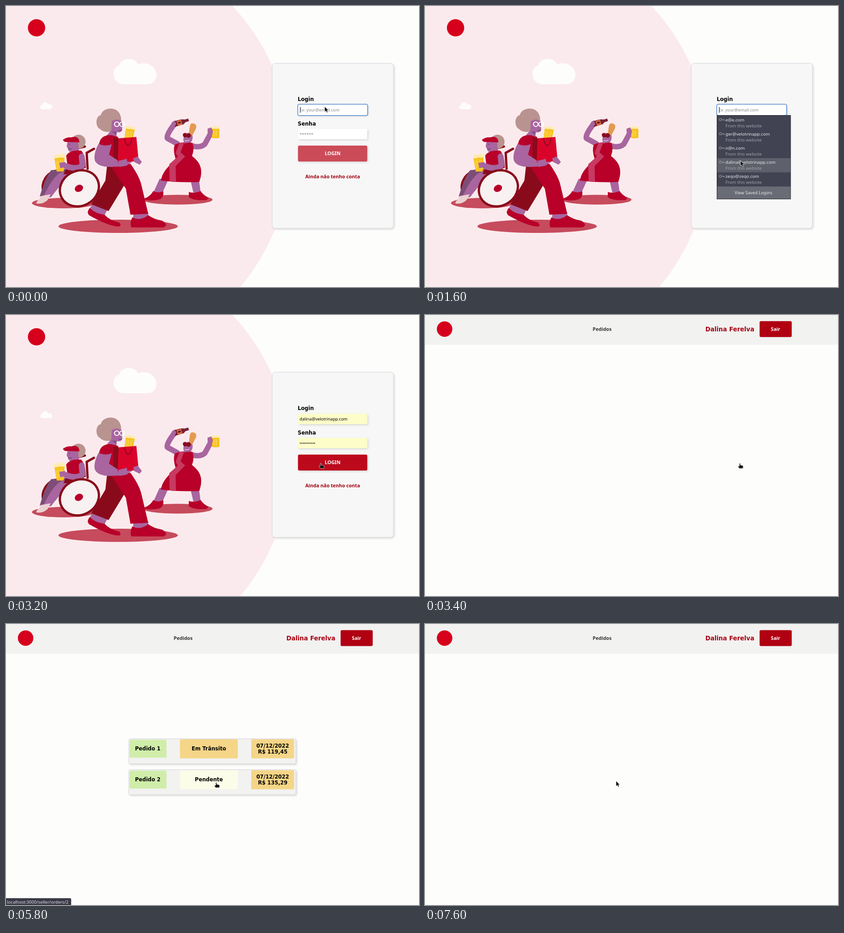
An HTML page for the animation above (8000 ms loop, 906x618 px).

```html
<!DOCTYPE html>
<html lang="pt">
<head>
<meta charset="utf-8">
<title>Pedidos</title>
<style>
html, body { margin: 0; width: 100%; height: 100%; overflow: hidden; background: #fdfdfc; }
svg { display: block; width: 906px; height: 618px; }
text { font: 9.6px "Noto Sans", sans-serif; }
.label { font: bold 11.4px "DejaVu Sans", sans-serif; }
.strong { font: bold 10.6px "Noto Sans", sans-serif; }
.input { font-size: 9.2px; }
.mid { text-anchor: middle; }
.red { fill: #b80029; } .dark { fill: #890b1b; } .skin { fill: #a8659f; }
.shade { fill: #7d4d77; } .hair { fill: #b9938f; } .floor { fill: #c64b5c; }
.gold { fill: #f8c31f; } .foam { fill: #fdebb4; }
.limb { fill: none; stroke: #a8659f; stroke-linecap: round; stroke-linejoin: round; }
.frame { fill: none; stroke: #890b1b; stroke-width: 5; stroke-linecap: round; }
.soft { filter: drop-shadow(2px 2px 2px #0002); }

/* one 8 s loop, picture changes on a 200 ms grid */
.t { animation: 8s step-end infinite; }
.app { animation-name: app; }
.menu { animation-name: menu; }
.hover { animation-name: hover; }
.empty { animation-name: empty; }
.filled { animation-name: filled; }
.focus { animation-name: focus; }
.button { animation-name: button; }
.orders { animation-name: orders; }
.status { animation-name: status; }
.hand { animation-name: hand; }
.arrow { animation-name: arrow; }
.pointer { animation: pointer 8s step-end infinite; }
@keyframes app { 0% { opacity: 0 } 42.5%, 100% { opacity: 1 } }
@keyframes menu { 0% { opacity: 0 } 5% { opacity: 1 } 22.5%, 100% { opacity: 0 } }
@keyframes hover {
  0% { transform: none } 12.5% { transform: translateY(31.2px) }
  15% { transform: translateY(62.4px) } 17.5%, 100% { transform: translateY(93.6px) }
}
@keyframes empty { 0% { opacity: 1 } 22.5%, 100% { opacity: 0 } }
@keyframes filled { 0% { opacity: 0 } 22.5%, 100% { opacity: 1 } }
@keyframes focus { 0% { opacity: 1 } 37.5%, 100% { opacity: 0 } }
@keyframes button { 0% { fill: #cb4b58 } 22.5% { fill: #b00012 } 37.5%, 100% { fill: #bd091c } }
@keyframes orders { 0% { opacity: 0 } 45% { opacity: 1 } 95%, 100% { opacity: 0 } }
@keyframes status { 0% { opacity: 0 } 62.5% { opacity: 1 } 95%, 100% { opacity: 0 } }
@keyframes hand {
  0% { opacity: 0 } 22.5% { opacity: 1 } 45% { opacity: 0 }
  62.5% { opacity: 1 } 95%, 100% { opacity: 0 }
}
@keyframes arrow {
  0% { opacity: 1 } 22.5% { opacity: 0 } 45% { opacity: 1 }
  62.5% { opacity: 0 } 95%, 100% { opacity: 1 }
}
@keyframes pointer {
  0% { transform: translate(699px, 221px) }
  2.5% { transform: translate(699px, 221px); animation-timing-function: steps(3) }
  10% { transform: translate(693.5px, 276px); animation-timing-function: steps(3) }
  17.5% { transform: translate(692px, 340px) }
  27.5% { transform: translate(692px, 338px) }
  32.5% { transform: translate(692px, 338px); animation-timing-function: steps(2) }
  37.5% { transform: translate(690.5px, 325.5px) }
  60% { transform: translate(690.5px, 325.5px); animation-timing-function: steps(4) }
  70%, 85% { transform: translate(461px, 348px); animation-timing-function: steps(3) }
  92.5%, 100% { transform: translate(419px, 345px) }
}
</style>
</head>
<body>
<svg viewBox="0 0 906 618">
  <defs>
    <g id="key" fill="none" stroke="#a4a5ae"><circle cx="648" cy="250" r="2.6"/><path d="M650.6 250H656.5V252.5M654 250V252"/></g>
    <g id="beer">
      <path class="gold" d="M1 3H17V26Q9 28 1 26Z"/>
      <path class="foam" d="M0 4Q0 1 4 1Q8 -2 12 1Q18 0 18 4L17 6H1Z"/>
      <path d="M5 10V23M10 10V23" stroke="#fbd95c" stroke-width="2"/>
    </g>
  </defs>

  <rect width="906" height="618" fill="#fdfdfc"/>
  <circle cx="157" cy="318.6" r="466" fill="#fbeaed"/>
  <circle cx="67" cy="48" r="19" fill="#d6001c"/>
  <g fill="#fdfdfc">
    <path d="M257 172C231 171 231 132 248 132C252 112 284 112 290 129C308 119 330 134 330 151Q329 171 310 172Z"/>
    <path d="M80 227C73 226 74 218 79 218C80 210 91 210 92 216Q101 215 101.500 222Q101 227 96 227Z"/>
  </g>

  <!-- floor shadows -->
  <g class="floor">
    <ellipse cx="126" cy="433.500" rx="69" ry="11.500"/>
    <ellipse cx="377" cy="426" rx="76" ry="10.800"/>
    <ellipse cx="246" cy="484.500" rx="131" ry="14.500"/>
  </g>

  <!-- seated figure -->
  <g>
    <path class="frame" d="M112 362C88 366 76 390 82 408Q87 419 99 416M157 313L173 309"/>
    <path class="shade" d="M99 361L139 358L134 374L112 384L94 418L74 419Q86 378 99 361Z"/>
    <path class="skin" d="M118 367L138 362L142 374L124 389L98 421L82 419Q100 380 118 367Z"/>
    <path d="M76 418L98 414L91 427Q80 437 66 434Q68 428 74 424Z" fill="#ead2d2"/>
    <path class="frame" d="M193 314L177 323L179 358"/>
    <circle class="hair" cx="159" cy="298.500" r="15.500"/>
    <path class="skin" d="M135 298L158 299L160 318L146 322Q136 321 136 314L133 309Z"/>
    <path class="red" d="M125 294Q134 288 143 289Q160 284 161 300L135 299Q126 300 125 294Z"/>
    <path d="M136 313Q139 316 144 314M138 304h3" fill="none" stroke="#54334f"/>
    <path class="red" d="M132 329Q140 316 165 318Q175 330 175 356L136 360Z"/>
    <path class="dark" d="M132 357L174 355L158 368L126 370Z"/>
    <path class="limb" d="M166 331L168 350Q160 359 141 355L124 350" stroke-width="13"/>
    <use href="#beer" transform="translate(104 327) rotate(-10) scale(.720 1.440)"/>
    <use href="#beer" transform="translate(117 324) rotate(3) scale(.700 1.480)"/>
    <path class="skin" d="M117 345L130 343L131 354L119 357Z"/>
    <ellipse cx="161" cy="401" rx="44" ry="38.500" transform="rotate(-28 161 401)" fill="#f8f1f1" stroke="#890b1b" stroke-width="5"/>
    <ellipse class="red" cx="160" cy="401" rx="9.500" ry="7.500" transform="rotate(-28 160 401)"/>
  </g>

  <!-- dancing figure -->
  <g>
    <path class="skin" d="M337 380H357L343 411H323ZM404 380H423L427 410H411Z"/>
    <path class="red" d="M304 424Q318 417 323 407Q334 413 345 407Q347 420 338 425Q320 430 304 426ZM401 409Q413 413 427 407Q432 415 443 421Q444 427 435 427Q409 428 401 420Z"/>
    <path class="limb" d="M376 303L354 291Q351 283 371 258" stroke-width="12"/>
    <path class="limb" d="M404 306Q424 314 436 304L448 282" stroke-width="12"/>
    <path class="red" d="M370 305Q386 297 409 301Q414 314 408 330C428 345 433 362 424 387Q380 389 340 384C343 362 361 350 372 336Q366 318 370 305Z"/>
    <path d="M380 302L391 300L383 322L393 331L372 352L373 387L359 386L358 348L377 331L372 323Z" fill="#c83a62"/>
    <path class="skin" d="M391 279L408 280Q412 294 405 300L391 302L389 294Z"/>
    <path d="M401 283C403 272 402 259 408 258C418 258 419 265 416 271L409 284Z" fill="#e49a50"/>
    <path class="dark" d="M388 284a4 4 0 0 1 8 -1a5 5 0 1 1 1 5q-8 3 -9 -4Z"/>
    <path d="M392 296Q398 298 402 295" fill="none" stroke="#fff"/>
    <g transform="translate(369 260) rotate(-17)">
      <path d="M0 -5Q9 -7 20 -5L25 -3H33V3H25L20 6H0Z" fill="#792034"/>
      <path d="M7 -5H17V6H7Z" fill="#dc6c3c"/><path d="M9 0h6" stroke="#611b29" stroke-width="4"/>
    </g>
    <circle class="skin" cx="368" cy="259" r="5"/>
    <path d="M453 270H446V284H454" fill="none" stroke="#f8c31f" stroke-width="3"/>
    <use href="#beer" transform="translate(451 264)"/>
    <path class="skin" d="M442 270L450 267L454 275L451 288L443 289Z"/>
  </g>

  <!-- walking figure -->
  <g>
    <path class="skin" d="M190 434L222 449L214 464L182 449Z"/>
    <path class="red" d="M184 444Q194 456 216 459Q228 472 248 476Q255 484 247 485Q224 484 182 460Q176 453 184 444Z"/>
    <path class="dark" d="M222 348L266 352L260 393L225 451L187 436L218 384Z"/>
    <path class="skin" d="M280 454H312V472H278Z"/>
    <path class="red" d="M277 465Q294 474 312 460Q324 469 342 472Q351 476 351 483L346 487H275Q271 478 277 465Z"/>
    <path class="red" d="M229 350L273 347Q294 376 298 398L312 457L273 459L263 402Z"/>
    <path class="hair" d="M207 271C195 266 196 242 208 240C212 222 245 219 251 241C256 253 248 263 240 264C240 278 216 281 207 271Z"/>
    <path class="skin" d="M232 253Q243 246 254 253L255 273Q251 280 242 277L243 290L219 287L231 273Z"/>
    <path class="shade" d="M232 276L243 277L242 283Z"/>
    <path d="M247 273Q251 275 254 273" fill="none" stroke="#54334f"/>
    <g fill="none" stroke="#fff" stroke-width="2.200"><circle cx="243" cy="260" r="5"/><circle cx="254.500" cy="260" r="5"/></g>
    <path class="red" d="M204 304Q207 283 231 284L246 288L252 347L219 350Z"/>
    <path class="dark" d="M236 289L252 292L250 343L236 335Z"/>
    <path class="skin" d="M203 303Q218 310 232 304L226 327L246 340L267 336L278 342L262 352L230 354Q201 354 195 340Q191 326 203 303Z"/>
    <use href="#beer" transform="translate(263 263) rotate(8) scale(.75 1.100)"/>
    <use href="#beer" transform="translate(273 264) rotate(12) scale(.65 1.050)"/>
    <path d="M247 291L286 288L291 341L245 344Z" fill="#da042b"/>
    <path d="M260 292Q263 306 268 307Q275 305 276 291" fill="none" stroke="#790d20" stroke-width="1.800"/>
    <path class="skin" d="M279 335L289 331L298 343L293 349L281 343ZM246 341L265 336L267 350L249 354Z"/>
  </g>

  <!-- login card -->
  <rect x="584" y="126" width="266" height="363" rx="7" fill="#f7f7f7" stroke="#d6d6df" class="soft"/>
  <text x="640" y="208.500" class="label">Login</text>
  <text x="640" y="262.500" class="label">Senha</text>
  <g class="soft" fill="#fff">
    <rect x="640.500" y="217" width="152" height="23" rx="2"/>
    <rect x="640.500" y="270" width="152" height="23" rx="2"/>
  </g>
  <g class="t empty" fill="#85858d">
    <text x="644" y="232" class="input">Ex: your@email.com</text>
    <text x="644" y="286" class="input">******</text>
    <path d="M645.500 222V235" stroke="#111"/>
  </g>
  <g class="t filled">
    <path d="M640.500 217h152v23h-152zM640.500 270h152v23h-152z" fill="#fcfdc9"/>
    <text x="644" y="232" class="input">dalina@velotrinapp.com</text>
    <text x="644" y="285" class="input">••••••••••</text>
    <path class="t focus" d="M751.500 222V235" stroke="#111"/>
  </g>
  <rect class="t focus" x="640" y="216" width="153.500" height="25" rx="3.500" fill="none" stroke="#558bd1" stroke-width="1.600"/>
  <g class="soft"><rect class="t button" x="640.500" y="307" width="152" height="35" rx="3"/></g>
  <text x="716.500" y="328" class="strong mid" fill="#fff">LOGIN</text>
  <text x="716.500" y="379" class="strong mid" fill="#a2000f">Ainda não tenho conta</text>

  <!-- saved logins -->
  <g class="t menu">
    <rect x="640.500" y="240.500" width="161.500" height="184" fill="#414352" stroke="#23232e"/>
    <rect class="t hover" x="641" y="241" width="160.500" height="31.200" fill="#5e606b"/>
    <rect x="641" y="397" width="160.500" height="27" fill="#6a6c75"/>
    <g id="rows" fill="#e8e8ec"></g>
    <text x="720.500" y="414" class="mid" fill="#e8e8ec">View Saved Logins</text>
  </g>

  <!-- orders page -->
  <g class="t app">
    <rect width="906" height="618" fill="#fdfdfc"/>
    <rect width="906" height="65.500" fill="#f2f2f1"/>
    <circle cx="43" cy="31" r="17" fill="#d6001c"/>
    <text x="388.500" y="35" class="strong mid" fill="#333">Pedidos</text>
    <text x="722.500" y="36" class="label" text-anchor="end" fill="#a8000f" style="font-size:13.300px">Dalina Ferelva</text>
    <rect x="734" y="13.500" width="70.500" height="35" rx="3" fill="#b00012"/>
    <text x="769" y="35" class="strong mid" fill="#fff">Sair</text>
    <g class="t orders" id="orders"></g>
    <g class="t status">
      <path d="M0 603H140Q143 603 143 606V618H0Z" fill="#3b3b48"/>
      <text x="2" y="615" fill="#dedee6">localhost:3000/seller/orders/2</text>
    </g>
  </g>

  <g class="pointer" stroke="#fff" stroke-width=".7" fill="#111">
    <path class="t arrow" d="M0 0V12L2.800 9.500L5 13.500L7 12.500L5 8.700H8.500Z"/>
    <path class="t hand" d="M-1 1Q0 -1 1 1L1.500 4.500L6 5.500Q8 6 7.500 9L7 12H-1L-4 8Q-4 6 -1 7Z"/>
  </g>
</svg>
<script>
const logins = ["e@e.com", "ger@velotrinapp.com", "n@n.com", "dalina@velotrinapp.com", "zeqo@zeqo.com"];
document.getElementById("rows").innerHTML = logins.map((mail, i) => `
  <g transform="translate(0 ${i * 31.1})">
    <use href="#key"/>
    <text x="659" y="254">${mail}</text>
    <text x="659" y="267" fill="#a0a1aa">From this website</text>
  </g>`).join("");

const orders = [["Em Trânsito", "#f5d587", "119,45"], ["Pendente", "#fcfde8", "135,29"]];
document.getElementById("orders").innerHTML = orders.map(([state, color, total], i) => `
  <g transform="translate(0 ${i * 68})">
    <rect x="269.5" y="252.5" width="366.500" height="55" rx="3" fill="#f2f2f1" stroke="#d5d5df" class="soft"/>
    <rect x="271" y="254.500" width="81" height="39.500" rx="2" fill="#d0edaa"/>
    <rect x="381.500" y="253.500" width="127" height="42" rx="3" fill="${color}"/>
    <rect x="538" y="253.500" width="94" height="42" rx="3" fill="#f5d587"/>
    <text x="311" y="278" class="label mid">Pedido ${i + 1}</text>
    <text x="445" y="278" class="label mid">${state}</text>
    <text x="585" y="272" class="label mid">07/12/2022</text>
    <text x="585" y="285" class="label mid">R$ ${total}</text>
  </g>`).join("");
</script>
</body>
</html>
```
